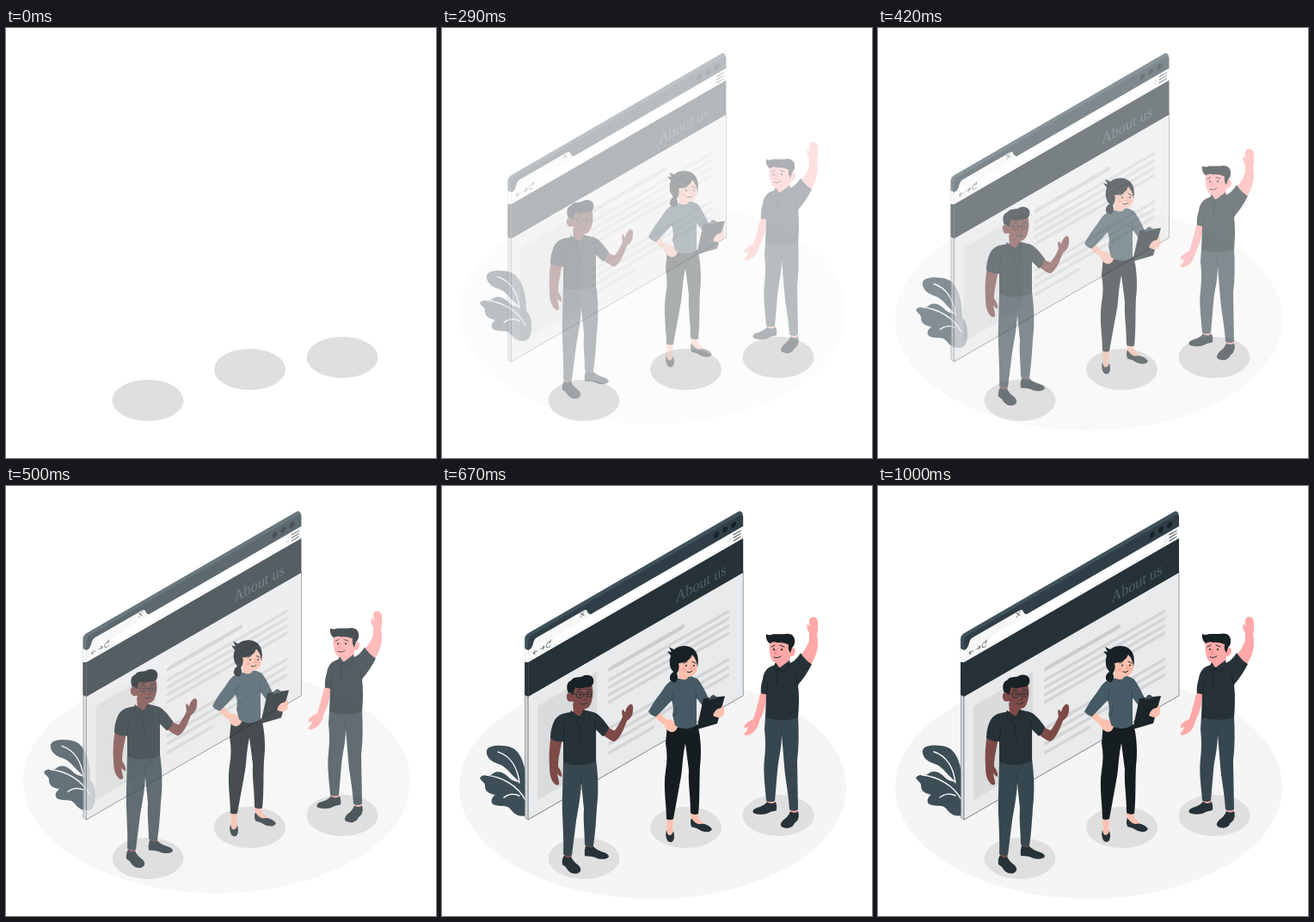
These frames come from a looping animation (500 px wide and 500 px high, 1.04 s). An HTML page:

```html
<!DOCTYPE html>
<html lang="en">
<head>
<meta charset="utf-8">
<title>About us</title>
<style>
  html, body { margin: 0; width: 100%; height: 100%; overflow: hidden; background: #fff; }
  svg { display: block; width: 100vw; height: 100vh; }
  .ink { fill: #263238; }
  .hair { fill: #182125; }
  .shoe { fill: #263238; }
  .jeans { fill: #37474f; }
  .brown { fill: #7d4a47; }
  .peach { fill: #ffc0ae; }
  .pink { fill: #ffa8a7; }
  .line { fill: none; stroke-linecap: round; stroke-linejoin: round; }
</style>
</head>
<body>
<svg viewBox="0 0 500 500" xmlns="http://www.w3.org/2000/svg">
  <g class="drop"><ellipse cx="245" cy="350" rx="225" ry="130" fill="#f5f5f5"/></g>

  <g fill="#dfdfdf">
    <ellipse cx="165" cy="433" rx="41.5" ry="24"/>
    <ellipse cx="283.5" cy="397" rx="41.5" ry="24"/>
    <ellipse cx="391" cy="383" rx="41.5" ry="24"/>
  </g>

  <!-- plant -->
  <g class="drop">
    <path fill="#3d4e57" d="M98 352C99 330 93 309 81 304C70 300 54 301 52 307C51 313 55 319 63 322C73 325 76 330 80 334C85 340 90 341 94 352Z"/>
    <path fill="#3d4e57" d="M44 339C48 334 56 337 58 335C64 329 72 333 77 338C83 345 90 343 95 346C102 350 104 358 104 367C104 376 101 383 97 383C89 385 84 381 80 376C76 370 70 373 63 371C55 370 57 362 62 359C51 357 50 352 50 348C50 344 45 343 44 339Z"/>
    <g class="line" stroke="#fff" stroke-width="1.4">
      <path d="M65 309C80 314 88 328 90 345"/>
      <path d="M51 336C70 338 88 348 97 365"/>
      <path d="M72 362C77 358 84 357 90 360"/>
    </g>
  </g>

  <!-- browser window -->
  <g class="slide">
    <path fill="#d5d7d8" stroke="#7b858a" stroke-width=".7" d="M96.4 188V385.5L100 388V190Z"/>
    <path class="ink" d="M96 205V243L100 245V205Z"/>
    <path fill="#fafafa" d="M96 188V204L100 205V190Z"/>
    <path fill="#3f525b" d="M96 189V178Q96 174 100 171.3L344 30Q347 28.3 349 31L350 36L104 182L100 191Z"/>
    <g transform="matrix(1 -.577 0 1 100 0)">
      <path fill="#e9eaeb" stroke="#7b858a" stroke-width=".8" d="M0 244H250V388H0Z"/>
      <path fill="#303f47" d="M0 192V181Q0 176 5 176H246Q250 176 250 180V192Z"/>
      <path fill="#f7f7f7" d="M0 191H3Q5 190 6 186Q7 182 10 182H65Q68 182 69 186Q70 190 73 191H250V205H0Z"/>
      <path class="ink" d="M0 205H250V245H0Z"/>
      <path class="line" stroke="#fff" stroke-width="9" d="M34 197.5H229"/>
      <g fill="#182227">
        <circle cx="219" cy="183" r="3.1"/><circle cx="229" cy="183" r="3.1"/><circle cx="239" cy="183" r="3.1"/>
      </g>
      <g class="line" stroke="#6a757a" stroke-width=".9">
        <path d="M61 183L65 188M65 183L61 188"/>
        <path d="M6 198H11M8 196L6 198L8 200M14 198H19M17 196L19 198L17 200"/>
        <path d="M26 196A2.7 3 0 1 0 26 200M26 194V196.5H24"/>
      </g>
      <circle cx="234" cy="198" r="1.8" fill="none" stroke="#dedede" stroke-width=".7"/>
      <path class="line" stroke="#455056" stroke-width="1.2" d="M239 194.5H247M239 198H247M239 201.5H247"/>
      <text transform="translate(171.5 235) scale(.87 1)" font-family="'Liberation Serif', 'Times New Roman', serif" font-size="18.6" fill="#4d616b">About us</text>
      <path fill="#d9dbdc" d="M11 262H80V371.5H11Z"/>
      <path class="line" stroke="#cbcdcf" stroke-width="5" d="M95.5 267.5H179.5"/>
      <path class="line" stroke="#d2d4d6" stroke-width="4" d="M95 280H232M95 288.5H232M95 297H232M95 305.5H232M95 336H232M95 345H232M95 354H232M95 364.5H145"/>
    </g>
  </g>

  <!-- man with glasses -->
  <g class="drop">
    <path class="brown" d="M142 425H151L150 435L143 434ZM167 414H176L176 422L168 422Z"/>
    <path class="shoe" d="M142 429Q145 434 150 431Q153 437 159 441Q164 447 158 450Q151 452 146 446Q144 442 140 440Q139 434 142 429Z"/>
    <path class="shoe" d="M167 418Q171 421 176 419Q181 424 189 426Q194 428 194 431Q190 435 181 433Q176 430 166 430Q165 424 167 418Z"/>
    <path class="jeans" d="M141 318H179C182 338 182 358 180 374C179 390 178 405 176 418Q171 420 166 417C166 403 164 390 165 375L162 345C161 363 158 377 156 389L151 429Q146 431 141 428C142 405 139 380 140 359Z"/>
    <path class="line" stroke="#2c3940" stroke-width=".8" d="M162 345L161 332L169 325"/>
    <path class="brown" d="M127 289L140 292C138 306 135 315 135 326Q140 333 139 338Q136 337 134 334L136 344Q137 349 132 347C127 343 125 336 125 326C124 313 125 300 127 289Z"/>
    <path class="brown" d="M180 281L191 277Q195 283 201 284C205 278 208 273 210 268Q208 259 211 260L213 263Q214 257 218 254Q223 252 222 261Q222 268 215 273C211 283 207 294 200 297Q194 295 186 288Z"/>
    <path class="ink" d="M148 263C139 264 133 267 130 274Q126 283 126 293Q133 298 141 297V321Q159 328 179 320V283L187 291Q192 288 194 280C188 272 182 263 173 262L165 260Z"/>
    <path class="line" stroke="#172024" stroke-width=".8" d="M141 297Q143 285 142 277M179 283L177 274M154 267Q160 278 161 296"/>
    <path class="brown" d="M152 252L166 255L165 266Q160 270 153 263Z"/>
    <path class="ink" stroke="#172024" stroke-width=".6" d="M150 261L159 269L154 274Q148 269 150 261ZM165 260L160 269L164 272Q167 266 165 260Z"/>
    <path class="brown" d="M151 230Q163 225 174 230Q177 240 174 250Q172 259 165 259Q156 258 152 250Q146 252 145 246Q144 240 149 240Z"/>
    <path class="hair" d="M147 241C143 231 147 227 150 226C154 220 160 224 165 220C172 218 178 222 176 229Q175 234 167 234Q160 236 155 234Q153 239 152 243Q148 238 147 241Z"/>
    <g class="line" stroke="#263238" stroke-width="1">
      <circle cx="160" cy="242.5" r="3.7"/><circle cx="170.5" cy="242" r="3.5"/>
      <path d="M152 241L156 242M164 242H167M157 237L162 236M168 236L173 237M161 253Q165 255 169 252"/>
      <path stroke="#5b302f" d="M167 243L168 248L165 249"/>
    </g>
    <g class="hair"><circle cx="160.5" cy="242.5" r="1.1"/><circle cx="170" cy="242" r="1.1"/></g>
  </g>

  <!-- woman with clipboard -->
  <g class="drop">
    <path class="peach" d="M261 385H269L268 400Q269 407 265 408Q261 405 262 398ZM289 380H297L298 386Q303 391 307 395L297 394Q290 390 290 386Z"/>
    <path class="shoe" d="M261 400Q262 406 265 406Q268 405 269 401Q271 407 269 412Q266 416 262 412Q259 406 261 400ZM290 386Q294 392 299 393Q303 392 306 393Q312 395 314 399Q311 404 302 401Q296 397 290 396Q288 390 290 386Z"/>
    <path fill="#151d20" d="M262 277Q280 284 297 277C301 291 302 310 300 325C299 345 300 364 298 381Q293 383 289 380C289 360 286 345 287 330L283 299C279 317 280 330 277 343L269 387Q265 389 261 387C261 370 257 350 260 331Q263 315 260 299Z"/>
    <path class="peach" d="M242 260L250 258Q255 267 261 271Q270 271 274 278Q274 285 267 286Q261 285 258 277Q249 272 242 260Z"/>
    <path fill="#455a64" d="M273 224C265 225 260 231 256 238Q247 249 240 262Q243 267 249 268Q259 258 267 249Q270 257 268 266L271 278Q283 286 296 278V246L304 257Q310 255 313 252C307 241 302 229 297 224L290 221Z"/>
    <path class="line" stroke="#31434c" stroke-width=".8" d="M267 249L269 238M296 247L295 238M270 268Q273 263 273 257"/>
    <path fill="#1b2428" d="M304 247L329 244L320 276L296 283Z"/>
    <path fill="#3a4b54" d="M310 249L312 245Q315 241 318 244L321 246Z"/>
    <path class="peach" d="M316 264Q319 258 324 258L327 254Q329 258 328 265Q324 271 318 268Q314 268 316 264Z"/>
    <path class="hair" d="M268 212Q275 217 274 224Q271 232 265 225Q264 219 269 216Z"/>
    <path class="peach" d="M275 212L286 217L286 223Q282 227 275 223Z"/>
    <path class="peach" d="M274 201Q285 190 296 198Q299 207 296 215Q293 222 286 221Q277 218 274 212Q270 212 270 207Z"/>
    <path class="hair" d="M266 197L262 192L267 193L264 187L270 190C277 184 291 184 296 194Q299 201 297 210Q296 201 291 196Q288 205 275 206Q277 212 273 218Q266 215 265 208Q264 202 266 197Z"/>
    <g class="line" stroke="#1b2428" stroke-width="1">
      <path d="M281 206L285 204M291 204L295 206M285 216Q288 218 291 215"/>
      <path stroke="#ed8f83" d="M290 208L291 212L288 212"/>
    </g>
    <g class="hair"><circle cx="284" cy="208.5" r="1"/><circle cx="293" cy="208.5" r="1"/></g>
    <g fill="#ff9c94" opacity=".7"><circle cx="281" cy="213" r="2"/><circle cx="294" cy="213" r="1.6"/></g>
  </g>

  <!-- waving man -->
  <g class="drop">
    <path class="pink" d="M378 362H387L387 371L379 371ZM405 372H414L413 382L406 382Z"/>
    <path class="shoe" d="M378 367Q383 371 388 367Q390 372 389 377Q382 378 377 381Q368 383 362 380Q360 376 366 374Q374 372 378 367ZM405 378Q410 381 414 378Q416 384 413 389Q410 391 408 395Q402 400 395 396Q392 393 397 388Q403 384 405 378Z"/>
    <path class="jeans" d="M376 267H414C415 285 415 303 413 319L414 376Q409 379 404 376C403 357 399 340 398 325L395 289C395 305 391 318 390 331L387 366Q382 368 377 366C376 350 373 333 375 317Q377 300 375 283Z"/>
    <path class="line" stroke="#2c3940" stroke-width=".8" d="M395 289L394 278L386 272"/>
    <path class="pink" d="M371 238L378 239C377 253 374 263 369 273Q368 281 361 287Q353 292 351 288Q355 285 356 280Q350 283 352 278Q356 273 362 271Q367 255 371 238Z"/>
    <path class="pink" d="M415 199Q424 189 427 179L427 171Q423 164 425 160L428 163Q425 153 431 152Q438 152 437 161Q438 167 436 173C439 186 435 199 428 209Z"/>
    <path class="ink" d="M387 208C378 210 374 216 373 224Q370 233 371 241L377 242L376 269Q395 275 414 269Q416 248 414 231C421 223 426 215 430 207Q423 203 417 194Q410 205 403 206Z"/>
    <path class="line" stroke="#151d20" stroke-width=".8" d="M377 242L379 229M414 231L411 218M392 211Q389 220 390 231"/>
    <path class="pink" d="M389 199L405 196L404 208Q396 216 389 208Z"/>
    <path class="ink" stroke="#151d20" stroke-width=".6" d="M388 205L392 212L388 215Q385 209 388 205ZM404 203L392 212L397 216Q406 211 404 203Z"/>
    <path class="pink" d="M382 178Q395 174 404 181L405 190Q410 185 411 191Q411 198 405 198Q402 205 392 206Q384 206 382 198Q379 188 382 178Z"/>
    <path class="hair" d="M381 183Q376 179 377 172Q381 174 385 172Q392 172 398 172Q408 170 410 178Q411 184 407 188L405 194Q402 190 403 184Q395 181 390 182Q385 180 381 183Z"/>
    <g class="line" stroke="#263238" stroke-width="1">
      <path d="M383 187L387 185M393 185L398 187M386 199Q390 201 394 198"/>
      <path stroke="#e87d7c" d="M389 190L387 195L390 195"/>
    </g>
    <g class="hair"><circle cx="386" cy="190" r="1.1"/><circle cx="395" cy="190" r="1.1"/></g>
  </g>
</svg>
<script>
  const LOOP = 1040, FPS = 24, TRAVEL = 30, LEAD = 0.02;
  const drops = document.querySelectorAll('.drop');
  const slide = document.querySelector('.slide');

  const bez = (s, a, b) => 3 * (1 - s) * (1 - s) * s * a + 3 * (1 - s) * s * s * b + s * s * s;

  // cubic-bezier(.36, -.01, .5, 1.38), overshoots before it settles
  function ease(x) {
    if (x >= 1) return 1;
    let lo = 0, hi = 1;
    for (let i = 0; i < 30; i++) {
      const mid = (lo + hi) / 2;
      if (bez(mid, 0.36, 0.5) < x) lo = mid; else hi = mid;
    }
    return bez(lo, -0.01, 1.38);
  }

  function place(el, dx, dy, alpha) {
    el.setAttribute('transform', `translate(${dx} ${dy})`);
    el.setAttribute('opacity', alpha);
  }

  function draw(ms) {
    const step = Math.min(FPS, Math.floor((ms + 5) * FPS / 1000));
    const p = step < 2 ? 0 : ease(step / FPS + LEAD);
    const shift = TRAVEL * (p - 1);
    const alpha = Math.max(0, Math.min(1, p));
    drops.forEach(el => place(el, 0, shift, alpha));
    place(slide, shift, 0, alpha);
  }

  const start = performance.now();
  function tick() {
    draw((performance.now() - start) % LOOP);
    requestAnimationFrame(tick);
  }
  draw(0);
  requestAnimationFrame(tick);
</script>
</body>
</html>
```
